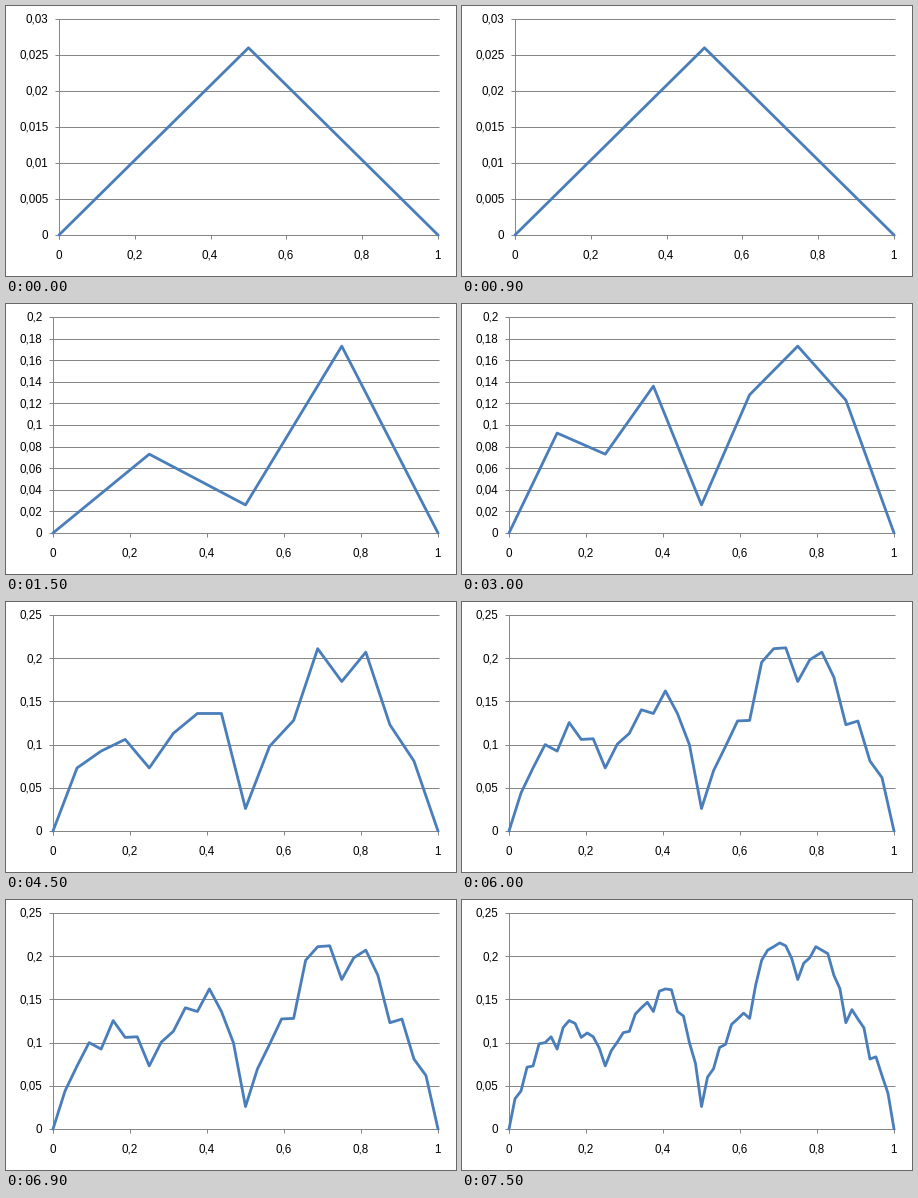
Write a matplotlib script that moves like this. It is 450x270 px and loops after 8 s.

```python
from math import cos, tau

import matplotlib.pyplot as plt
from matplotlib.animation import FuncAnimation

W, H, DPI = 450, 270, 100
PX = 72 / DPI
RIGHT, TOP, BOTTOM = 432, 13, 229
GREY, BLUE = "#868686", "#4a7ebb"
STEP_MS, STAGE_MS, LOOP_MS = 500, 1500, 8000

# Key heights at every sixteenth of the width
KEYS = [0, .073, .0925, .106, .073, .113, .136, .136, .026,
        .098, .128, .211, .173, .207, .123, .081, 0]
KEY_LEVEL = 4

# Crest position and period of the ripple that lifts finer midpoints
RIPPLES = {5: (2, 4.1), 6: (.5, 14)}


def subdivide(ys, level):
    """Insert midpoints, lifted by an amount that halves at each level."""
    crest, period = RIPPLES[level]
    out = [ys[0]]
    for i, (a, b) in enumerate(zip(ys, ys[1:])):
        lift = .5 ** level * (.54 + .3 * cos(tau * (i - crest) / period))
        out += [(a + b) / 2 + lift, b]
    return out


def profile(level):
    ys = KEYS[::2 ** max(0, KEY_LEVEL - level)]
    for n in range(KEY_LEVEL + 1, level + 1):
        ys = subdivide(ys, n)
    return ys


def scale(level):
    """Left edge, axis maximum and number of grid rows."""
    if level == 1:
        return 53, .03, 6
    return (47, .2, 10) if level < 4 else (47, .25, 5)


def number(v):
    return f"{round(v, 3):g}".replace(".", ",")


fig = plt.figure(figsize=(W / DPI, H / DPI), dpi=DPI, facecolor="white")
ax = fig.add_axes([0, 0, 1, 1])


def rule(x0, y0, x1, y1):
    ax.plot([x0, x1], [y0, y1], color=GREY, lw=PX, solid_capstyle="butt")


def label(x, y, v, ha):
    ax.text(x, y, number(v), ha=ha, va="baseline", color="black",
            family="Liberation Sans", fontsize=11.6 * PX)


def draw(frame):
    level = frame * STEP_MS // STAGE_MS + 1
    left, top_value, rows = scale(level)
    width, height = RIGHT - left, BOTTOM - TOP

    ax.clear()
    ax.set(xlim=(0, W), ylim=(H, 0))
    ax.axis("off")

    for i in range(rows + 1):
        y = BOTTOM - height * i / rows
        rule(left - 4, y, RIGHT + 1, y)
        label(left - 10.5, y + 4, top_value * i / rows, "right")
    rule(left, TOP, left, BOTTOM + 4)
    for i in range(6):
        x = left + width * i / 5
        rule(x, BOTTOM, x, BOTTOM + 4)
        label(x - .5, 253, i / 5, "center")

    ys = profile(level)
    n = len(ys) - 1
    ax.plot([left + width * k / n for k in range(n + 1)],
            [BOTTOM - height * y / top_value for y in ys],
            color=BLUE, lw=2.8 * PX, solid_capstyle="round",
            solid_joinstyle="round", zorder=3)
    return ax.get_children()


anim = FuncAnimation(fig, draw, frames=LOOP_MS // STEP_MS, interval=STEP_MS,
                     init_func=lambda: draw(0), repeat=True, repeat_delay=0)
plt.show()
```
